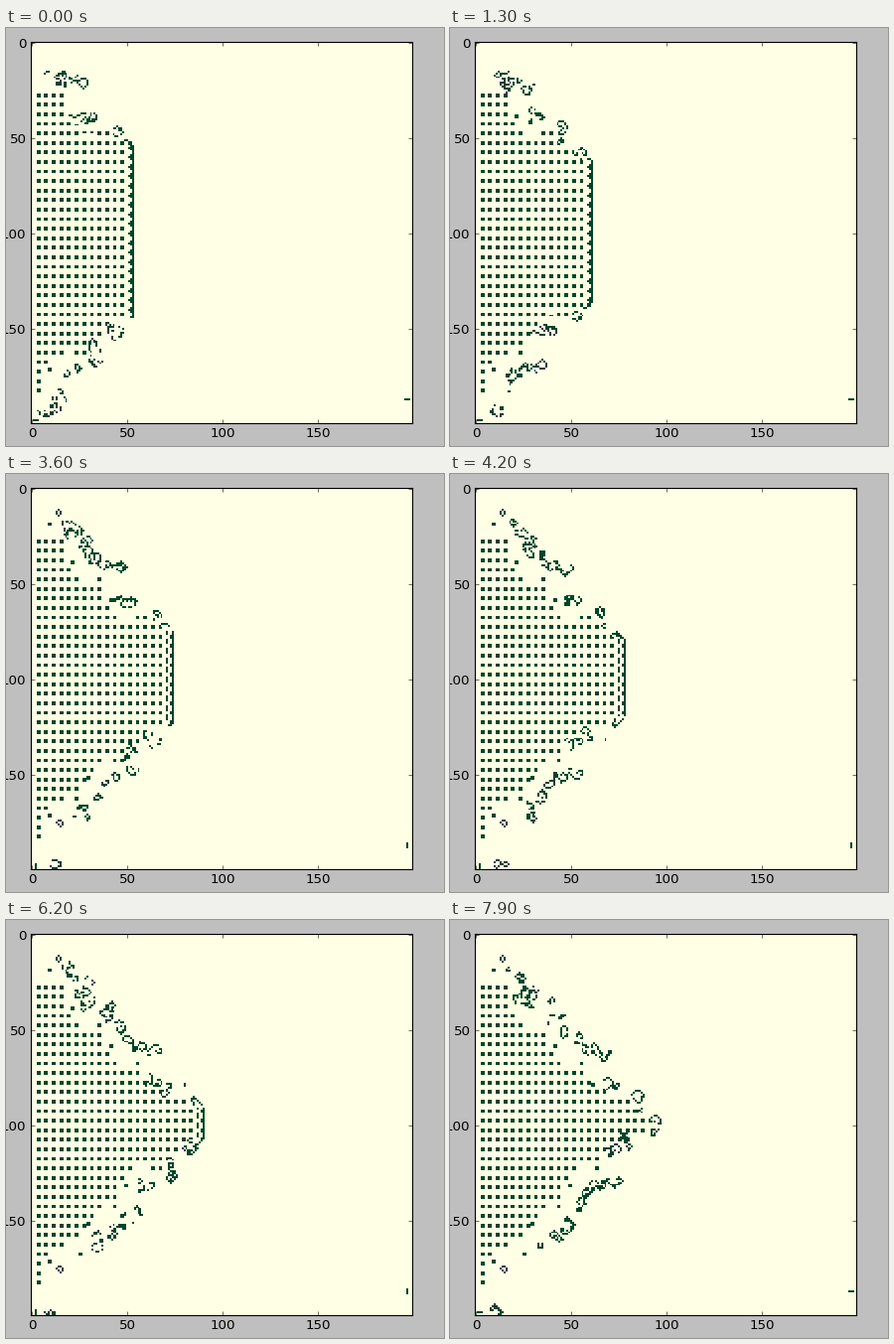
A matplotlib script that plays this animation: 441x421 px, repeating every 8 s.

```python
import matplotlib.pyplot as plt
import numpy as np
from matplotlib.animation import FuncAnimation

N = 200                 # cells per side
W, H, DPI = 441, 421, 80
FRAMES = 80
LEFT, TOP, SIDE = 25, 14, 383.99    # axes in pixels
FIRST_GEN = 49          # generation shown when the loop begins


def seed():
    """A wave front: one full column with a pair of cells behind it every five rows."""
    grid = np.zeros((N, N), int)
    rows = np.arange(5, 194)
    grid[rows, 4] = 1
    grid[rows[(rows % 5 == 2) | (rows % 5 == 3)], 3] = 1
    return grid


def life_step(grid):
    p = np.pad(grid, 1)
    total = sum(p[dy:dy + N, dx:dx + N] for dy in range(3) for dx in range(3))
    return ((total == 3) | ((total == 4) & (grid == 1))).astype(int)


def add_settled_blocks(grid, front):
    """Blocks left by the wave, in rows whose length tapers to both ends."""
    for k in range(31):
        last = round(np.interp(k, [2, 8, 14, 15, 19, 26, 28, 30],
                               [3, 10, 21, 21, 12, 5, 1, 0]))
        for i in range(last + 1):
            x, y = 3 + 4 * i, 27 + 5 * k
            if front >= x + 5:
                grid[y:y + 2, x:x + 2] = 1


def add_blinker(grid, x, y, upright):
    if upright:
        grid[y - 1:y + 2, x] = 1
    else:
        grid[y, x - 1:x + 2] = 1


def generation(frame):
    return int(0.587 * frame + 0.61)


def build_history():
    grid = seed()
    for _ in range(FIRST_GEN):
        grid = life_step(grid)
    history = []
    for gen in range(generation(FRAMES - 1) + 1):
        shown = grid.copy()
        add_settled_blocks(shown, 4 + FIRST_GEN + gen)
        add_blinker(shown, 2, 198, gen % 2)
        add_blinker(shown, 197, 187, gen % 2)
        history.append(shown)
        grid = life_step(grid)
    return history


history = build_history()

plt.rcParams["font.family"] = "DejaVu Sans"
fig = plt.figure(figsize=(W / DPI, H / DPI), dpi=DPI, facecolor="0.75")
ax = fig.add_axes([LEFT / W, 1 - (TOP + 384) / H, SIDE / W, SIDE / H])
image = ax.imshow(history[0], cmap="YlGn", vmin=0, vmax=1,
                  interpolation="nearest", aspect="auto")
ax.set_xticks(range(0, N, 50))
ax.set_yticks(range(0, N, 50))
ax.tick_params(direction="in", top=True, right=True, length=4, width=0.5,
               pad=4, labelsize=12)
for spine in ax.spines.values():
    spine.set_linewidth(1)


def draw(frame):
    image.set_data(history[generation(frame)])
    return [image]


anim = FuncAnimation(fig, draw, frames=FRAMES, interval=100, repeat=True,
                     repeat_delay=0)
plt.show()
```
